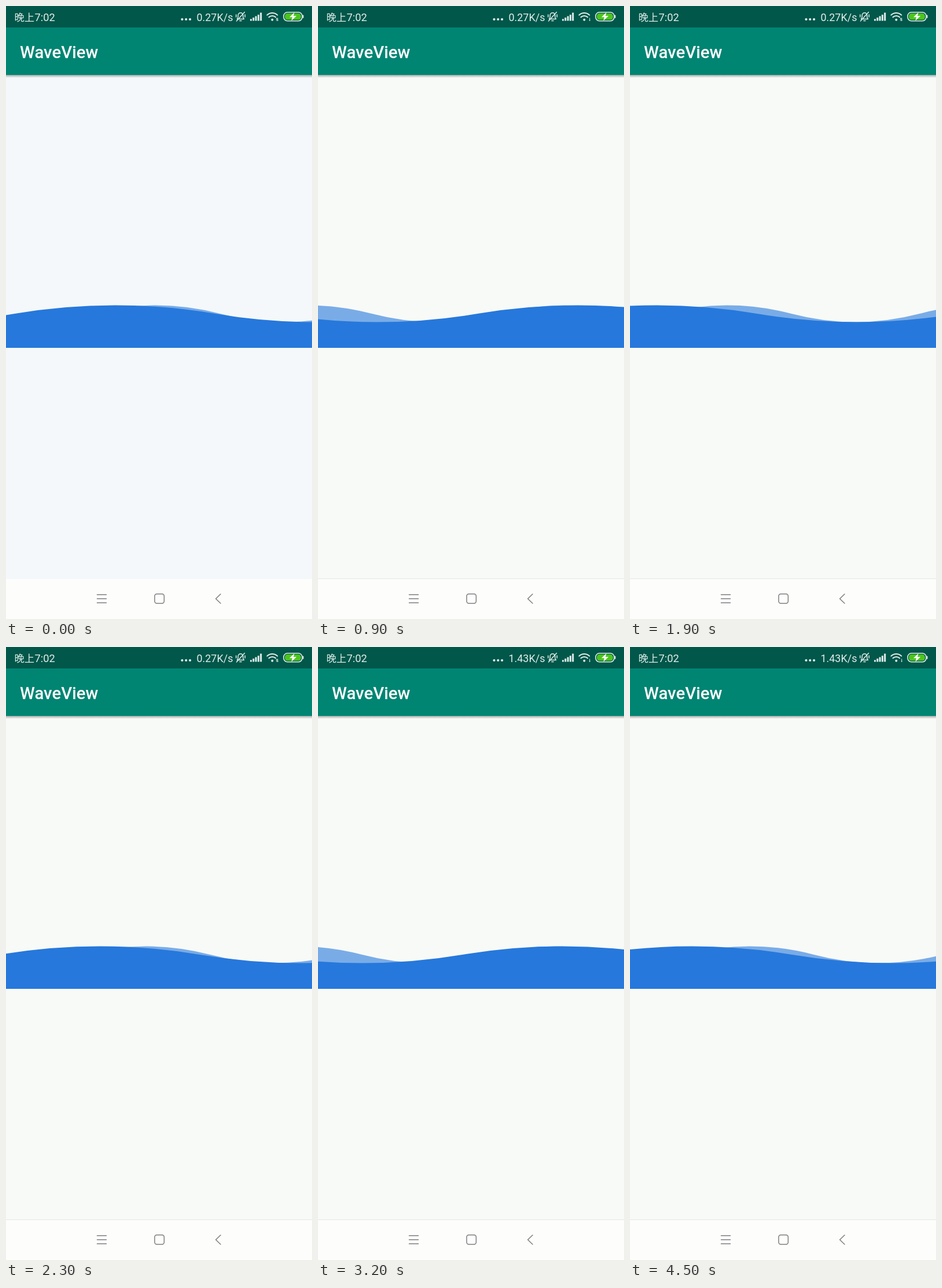
Write an HTML page that moves like this. It is 529 by 1058 pixels and loops after 4600 ms.

```html
<!DOCTYPE html>
<html lang="zh">
<head>
<meta charset="utf-8">
<title>WaveView</title>
<style>
  html, body { margin: 0; width: 100%; height: 100%; overflow: hidden; }
  svg { display: block; }
  text { font-family: Roboto, "Noto Sans CJK SC", "Noto Sans CJK", sans-serif; }
  .line { fill: none; stroke-linecap: round; stroke-linejoin: round; }
</style>
</head>
<body>
<svg width="529" height="1058" viewBox="0 0 529 1058">
  <defs>
    <linearGradient id="shade" x2="0" y2="1">
      <stop stop-color="#000" stop-opacity=".32"/>
      <stop offset="1" stop-color="#000" stop-opacity="0"/>
    </linearGradient>
  </defs>
  <rect id="page" width="529" height="1058"/>

  <path id="back" fill="#2678dc" fill-opacity=".6"/>
  <path id="front" fill="#2678dc"/>

  <rect y="119" width="529" height="5" fill="url(#shade)"/>
  <rect y="37" width="529" height="82" fill="#008573"/>
  <rect width="529" height="37" fill="#00574a"/>
  <text x="24" y="90" font-size="29.4" font-weight="500" fill="#fff">WaveView</text>

  <g fill="#e0eeeb">
    <text x="14.5" y="25.5" font-size="17.3">晚上</text>
    <text x="49.5" y="25.5" font-size="18.3">7:02</text>
    <text id="speed" x="392.5" y="25.5" font-size="18" text-anchor="end"></text>
    <circle cx="304.5" cy="23" r="2.1"/>
    <circle cx="311.3" cy="23" r="2.1"/>
    <circle cx="318.1" cy="23" r="2.1"/>
    <path d="M422 25.5v-3h3v3zM426.3 25.5v-5.5h3v5.5zM430.6 25.5v-8h3v8zM434.9 25.5v-10.5h3v10.5zM439.2 25.5v-14h3v14z"/>
    <circle cx="460.3" cy="23.8" r="2"/>
    <path id="up" d="M466.6 22.2l1.3-2 1.3 2h-.8v3.6h-1v-3.6z"/>
    <path id="down" d="M468.4 24.2l1.3 2 1.3-2h-.8v-3.6h-1v3.6z"/>
  </g>
  <g class="line" stroke="#e0eeeb" stroke-width="1.5">
    <path d="M399.5 22.5h12l-1.7-3v-3.5a4.3 4.3 0 0 0-8.6 0v3.5zM404 25.5h3M398.5 26l14-15.5M397.8 15v4M413.2 15v4"/>
    <path stroke-width="2" d="M451.3 15.6a13 13 0 0 1 18 0M454.5 19.3a8.4 8.4 0 0 1 11.6 0"/>
    <rect x="480" y="10.8" width="32" height="15" rx="6.5" stroke-width="1.6"/>
    <path stroke-width="1.8" d="M513.6 16.5v3.6"/>
  </g>
  <rect x="482" y="12.8" width="28" height="11" rx="4.7" fill="#4cc51c"/>
  <path fill="#fff" d="M498.6 11l-8.6 8.3h5l-1.6 6.3 8.8-8.6h-5.2z"/>

  <rect y="989" width="529" height="69" fill="#fdfefc"/>
  <rect id="divider" y="988" width="529" height="1" fill="#e4e6e4"/>
  <g class="line" stroke="#7c7e7d" stroke-width="1.5">
    <path d="M157.5 1016h16M157.5 1023h16M157.5 1030h16M371 1015l-8.3 8 8.3 8"/>
    <rect x="257" y="1014.7" width="16.4" height="16.4" rx="3.8"/>
  </g>
</svg>
<script>
const LOOP = 4600, STEP = 100, PERIOD = 2390;
const MID = 531, BOTTOM = 590, PULL = 29;
const el = id => document.getElementById(id);

// Both waves travel one wavelength per period.
const waves = [
  { path: el("back"), length: 444, phase: .583 },
  { path: el("front"), length: 692, phase: .272 }
];

for (const { path, length } of waves) {
  const half = length / 2;
  const rest = `t${half} 0`.repeat(5);
  path.setAttribute("d", `M0 ${MID}q${half / 2} ${-PULL} ${half} 0${rest}V${BOTTOM}H0z`);
}

const show = (id, on) => el(id).setAttribute("visibility", on ? "visible" : "hidden");

function draw(now) {
  const t = Math.floor(now % LOOP / STEP) * STEP;
  for (const { path, length, phase } of waves) {
    const x = ((phase + t / PERIOD) % 1 - 1.25) * length;
    path.setAttribute("transform", `translate(${x} 0)`);
  }
  el("page").setAttribute("fill", t < STEP ? "#f4f8fa" : "#f8faf8");
  show("divider", t >= STEP);
  el("speed").textContent = t < 3100 ? "0.27K/s" : "1.43K/s";

  const busy = (t + 100) % 2000 < 500;
  show("up", busy);
  show("down", true);
  requestAnimationFrame(draw);
}

const start = performance.now();
const begin = () => draw(0);
function draw0(now) { draw(now); }
requestAnimationFrame(draw);
</script>
</body>
</html>
```
